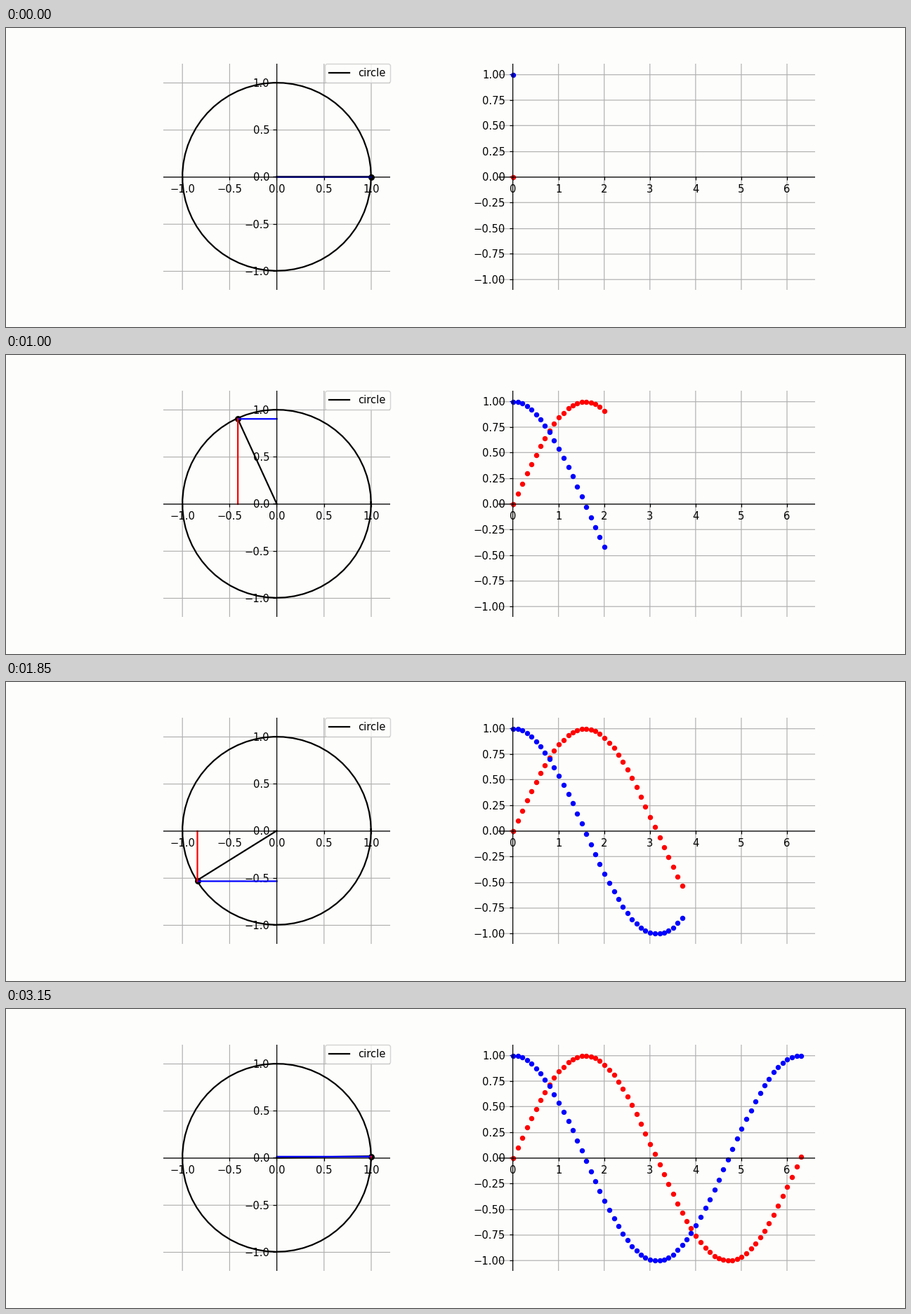
These frames come from a looping animation (1280x427 px, 3.2 s). A matplotlib script:

```python
import numpy as np
import matplotlib.pyplot as plt
from matplotlib.animation import FuncAnimation
from matplotlib.ticker import MultipleLocator

WIDTH, HEIGHT = 1280, 427
DPI = WIDTH / 12
COLUMNS, ROWS = 1200, 400  # coarse raster that straight lines and dots sit on
BACKGROUND = "#fdfdfb"
STEPS = 64
INTERVAL = 50

plt.rcParams.update({
    "font.family": "DejaVu Sans",
    "font.size": 10,
    "figure.facecolor": BACKGROUND,
    "savefig.facecolor": BACKGROUND,
    "axes.facecolor": BACKGROUND,
})

angles = np.arange(STEPS) * 0.1
cosines, sines = np.cos(angles), np.sin(angles)

fig, (circle_ax, wave_ax) = plt.subplots(
    1, 2, figsize=(WIDTH / DPI, HEIGHT / DPI), dpi=DPI)
fig.subplots_adjust(left=0.125, right=0.9, bottom=0.125, top=0.88, wspace=0.2)


def snap(values, start, end, cells, limits):
    """Move data values to the nearest raster cell centres along one axis."""
    low, high = limits
    scale = (end - start) * cells / (high - low)
    cell = start * cells + (np.asarray(values) - low) * scale
    centre = np.floor(cell + 0.5) + 0.5
    return low + (centre - start * cells) / scale


def snap_x(ax, values):
    box = ax.get_position()
    return snap(values, box.x0, box.x1, COLUMNS, ax.get_xlim())


def snap_y(ax, values):
    box = ax.get_position()
    return snap(values, 1 - box.y1, 1 - box.y0, ROWS, ax.get_ylim()[::-1])


def style_axes(ax, xlim, ylim, xstep, ystep, aspect):
    """Cross the axes at the origin and draw the grid."""
    ax.set(xlim=xlim, ylim=ylim, aspect=aspect)
    ax.apply_aspect()
    ax.xaxis.set_major_locator(MultipleLocator(xstep))
    ax.yaxis.set_major_locator(MultipleLocator(ystep))
    for side in ("left", "bottom"):
        ax.spines[side].set_position("zero")
    ax.spines[:].set_visible(False)

    def multiples(limits, step):
        return np.arange(np.ceil(limits[0] / step), limits[1] / step) * step

    grid = dict(color="#b0b0b0", linewidth=0.8, zorder=1, snap=False)
    for x in snap_x(ax, multiples(xlim, xstep)):
        ax.axvline(x, **grid)
    for y in snap_y(ax, multiples(ylim, ystep)):
        ax.axhline(y, **grid)
    axis_line = dict(grid, color="black", zorder=2.5)
    ax.axvline(snap_x(ax, 0), **axis_line)
    ax.axhline(snap_y(ax, 0), **axis_line)


style_axes(circle_ax, (-1.2, 1.2), (-1.2, 1.2), 0.5, 0.5, "equal")
style_axes(wave_ax, (-0.315, 6.615), (-1.1, 1.1), 1, 0.25, "auto")

circle_ax.plot(cosines, sines, color="black", label="circle")
circle_ax.legend(loc="upper right", bbox_to_anchor=(1, 1), borderaxespad=0)

point, = circle_ax.plot([], [], "o", color="black", markersize=5)
radius, = circle_ax.plot([], [], color="black", snap=False)
cos_line, = circle_ax.plot([], [], color="blue", snap=False)
sin_line, = circle_ax.plot([], [], color="red", snap=False)
sin_dots, = wave_ax.plot([], [], "o", color="red", markersize=4)
cos_dots, = wave_ax.plot([], [], "o", color="blue", markersize=4)

dot_x = snap_x(wave_ax, angles)
sin_y, cos_y = snap_y(wave_ax, sines), snap_y(wave_ax, cosines)


def update(step):
    radius.set_data([0, cosines[step]], [0, sines[step]])
    x0, x = snap_x(circle_ax, [0, cosines[step]])
    y0, y = snap_y(circle_ax, [0, sines[step]])
    point.set_data([x], [y])
    cos_line.set_data([x0, x], [y, y])
    sin_line.set_data([x, x], [y0, y])
    shown = slice(step + 1)
    sin_dots.set_data(dot_x[shown], sin_y[shown])
    cos_dots.set_data(dot_x[shown], cos_y[shown])
    return point, radius, cos_line, sin_line, sin_dots, cos_dots


animation = FuncAnimation(fig, update, frames=STEPS, interval=INTERVAL,
                          init_func=lambda: update(0), repeat=True,
                          repeat_delay=0)
plt.show()
```
